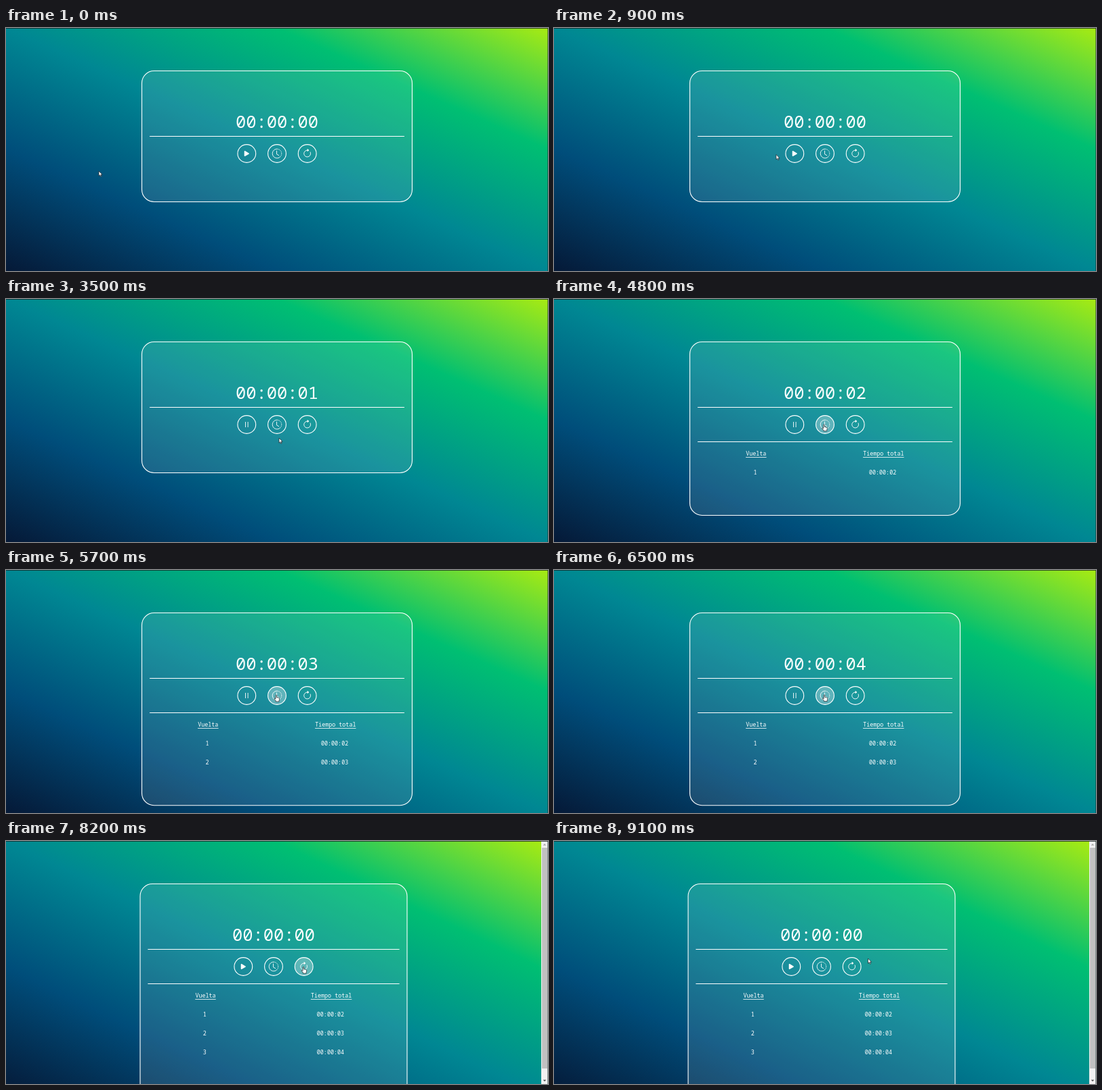
An HTML page that plays this animation: 800x360 px, repeating every 9.2 s.

```html
<!DOCTYPE html>
<html lang="es">
<head>
<meta charset="utf-8">
<title>Cronómetro</title>
<style>
  html, body { margin: 0; width: 100%; height: 100%; overflow: hidden; }
  #stage { position: relative; width: 800px; height: 360px; overflow: hidden; }
  #page {
    position: absolute; left: 0; top: 0;
    background: linear-gradient(to right top, #051937, #004d7a, #008793, #00bf72, #a8eb12);
  }
  svg { position: absolute; left: 0; top: 0; }
  text {
    font-family: "Noto Sans Mono", "DejaVu Sans Mono", monospace;
    font-size: 8.4px; font-weight: 500; fill: #fff; text-anchor: middle;
  }
  #time { font-size: 25.4px; }
  .rule { fill: #fff; }
  .button circle { fill: #fff; fill-opacity: 0; stroke: #fff; stroke-width: 1.1; }
  .button.hover circle { fill-opacity: .3; }
  .button path { fill: #fff; }
  .button path.line { fill: none; stroke: #fff; }
  #cursor path { fill: #fff; stroke: #1b1f24; stroke-width: .7; stroke-linejoin: round; }
</style>
</head>
<body>
<div id="stage">
  <div id="page"></div>
  <svg width="800" height="360" viewBox="0 0 800 360">
    <rect id="card" y="63.5" rx="18" fill="#fff" fill-opacity=".1" stroke="#fff" stroke-width="1.1"/>
    <text id="time" y="147.7"></text>
    <rect class="rule" y="160" height="1"/>
    <g class="button">
      <circle r="13.4"/>
      <g transform="scale(.9) translate(-8 -8)">
        <path id="play" d="m11.6 8.7-6.36 3.69c-.54.31-1.24-.07-1.24-.7V4.31c0-.63.7-1.01 1.24-.7l6.36 3.7a.8.8 0 0 1 0 1.39z"/>
        <path id="pause" class="line" stroke-linecap="round" d="M6 4v8M10 4v8"/>
      </g>
    </g>
    <g class="button">
      <circle r="13.4"/>
      <g transform="scale(.9) translate(-8 -8)">
        <path class="line" d="M8 .5A7.5 7.5 0 1 0 13.3 13.3"/>
        <path class="line" stroke-dasharray="1.7 1" d="M8 .5A7.5 7.5 0 0 1 13.3 13.3"/>
        <path class="line" stroke-linecap="round" stroke-linejoin="round" d="M7.5 3.5V9L11 11"/>
      </g>
    </g>
    <g class="button">
      <circle r="13.4"/>
      <g transform="scale(.9) translate(-8 -8)">
        <path class="line" stroke-linecap="round" d="M8 2.5A5.5 5.5 0 1 0 13 5.7"/>
        <path d="M8 4.47V.53a.25.25 0 0 1 .41-.19l2.36 1.97c.12.1.12.28 0 .38L8.41 4.66A.25.25 0 0 1 8 4.47z"/>
      </g>
    </g>
    <g id="laps">
      <rect class="rule" y="211" height="1"/>
      <text class="head" y="231.7">Vuelta</text>
      <text class="head" y="231.7">Tiempo total</text>
      <rect class="under" y="234" width="30.5" height=".8" fill="#fff"/>
      <rect class="under" y="234" width="60.5" height=".8" fill="#fff"/>
    </g>
    <g id="bar">
      <rect x="790" width="10" height="360" fill="#f1f1f1"/>
      <rect x="791" y="10" width="8" height="327" fill="#c1c1c1"/>
      <path d="M792.7 6.5h4.6L795 4z" fill="#a3a3a3"/>
      <path d="M792.7 353.8h4.6L795 356.3z" fill="#505050"/>
    </g>
    <rect width="800" height="1" fill="#14201f" fill-opacity=".75"/>
    <rect x="799" width="1" height="360" fill="#14302f" fill-opacity=".5"/>
    <g id="cursor">
      <path id="arrow" d="M0 0V7.2L1.7 5.7 2.8 8.2 4 7.7 2.9 5.3H5.1z"/>
      <path id="hand" d="M-.8.4Q0-.5.8.4V3.4L3.6 4Q4.8 4.3 4.8 5.4L4.2 8.2V9.6H-.6V8.4L-2.8 5.6Q-2.7 4.4-1.6 5L-.8 5.8z"/>
    </g>
  </svg>
</div>
<script>
const LOOP = 9200, STEP = 100;
const START = 2100, RESET = 7800;
const LAPS = [4600, 5600, 6700];
const ROW = 28.2;

// time, x, y of the pointer tip
const PATH = [
  [0, 137, 212], [200, 137, 212], [1100, 355.5, 184], [2300, 355.5, 184],
  [2900, 403, 206], [3800, 403, 206], [4300, 398.5, 186], [4800, 398.5, 186],
  [6300, 399, 185], [6800, 399, 185], [7300, 439, 186.5], [8200, 439, 186.5],
  [8800, 463.5, 174], [LOOP, 463.5, 174]
];

const $ = id => document.getElementById(id);
const all = sel => [...document.querySelectorAll(sel)];
const set = (el, attrs) => { for (const k in attrs) el.setAttribute(k, attrs[k]); };
const show = (el, on) => { el.style.display = on ? "" : "none"; };

const rules = all(".rule"), buttons = all(".button");
const heads = all(".head"), unders = all(".under");

const clock = t => {
  const s = t < START || t >= RESET ? 0 : Math.floor((t - START) / 1000);
  return "00:00:" + String(s).padStart(2, "0");
};

const addText = (str, y) => {
  const el = document.createElementNS("http://www.w3.org/2000/svg", "text");
  el.textContent = str;
  set(el, { y });
  $("laps").append(el);
  return el;
};
const rows = LAPS.map((at, i) =>
  [String(i + 1), clock(at)].map(str => addText(str, 260 + i * ROW)));

function pointer(t) {
  const i = PATH.findIndex(p => p[0] > t);
  const [t0, x0, y0] = PATH[i - 1], [t1, x1, y1] = PATH[i];
  const u = (t - t0) / (t1 - t0), e = u * u * (3 - 2 * u);
  return [x0 + (x1 - x0) * e, y0 + (y1 - y0) * e];
}

function layout(count) {
  const full = count === LAPS.length;
  const width = full ? 790 : 800, mid = width / 2;
  const bottom = count ? 292.3 + count * ROW : 257.5;
  const inner = width * 0.47, left = mid - inner / 2;

  $("page").style.width = width + "px";
  $("page").style.height = (full ? 376 : 360) + "px";
  set($("card"), { x: width / 4 + 0.5, width: mid - 1, height: bottom - 63.5 });
  set($("time"), { x: mid });
  rules.forEach(r => set(r, { x: left, width: inner }));
  buttons.forEach((b, i) => set(b, { transform: `translate(${mid + (i - 1) * 44.7} 186)` }));

  const cols = [0.25, 0.75].map(f => left + inner * f - 7.7);
  cols.forEach((x, i) => {
    set(heads[i], { x });
    set(unders[i], { x: x - unders[i].getAttribute("width") / 2 });
    rows.forEach(row => set(row[i], { x: x - 1.2 }));
  });
  rows.forEach((row, i) => row.forEach(el => show(el, i < count)));
  show($("laps"), count > 0);
  show($("bar"), full);
  return mid;
}

function draw(t) {
  const mid = layout(LAPS.filter(at => t >= at).length);
  const running = t >= START && t < RESET;
  $("time").textContent = clock(t);
  show($("play"), !running);
  show($("pause"), running);

  const [x, y] = pointer(t);
  let over = false;
  buttons.forEach((b, i) => {
    const hit = Math.hypot(x - mid - (i - 1) * 44.7, y - 186) < 13.5;
    b.classList.toggle("hover", hit);
    over = over || hit;
  });
  set($("cursor"), { transform: `translate(${x} ${y})` });
  show($("hand"), over);
  show($("arrow"), !over);
}

const origin = performance.now();
function tick() {
  const t = Math.max(0, performance.now() - origin) % LOOP;
  draw(Math.floor(t / STEP) * STEP);
  requestAnimationFrame(tick);
}
tick();
</script>
</body>
</html>
```
